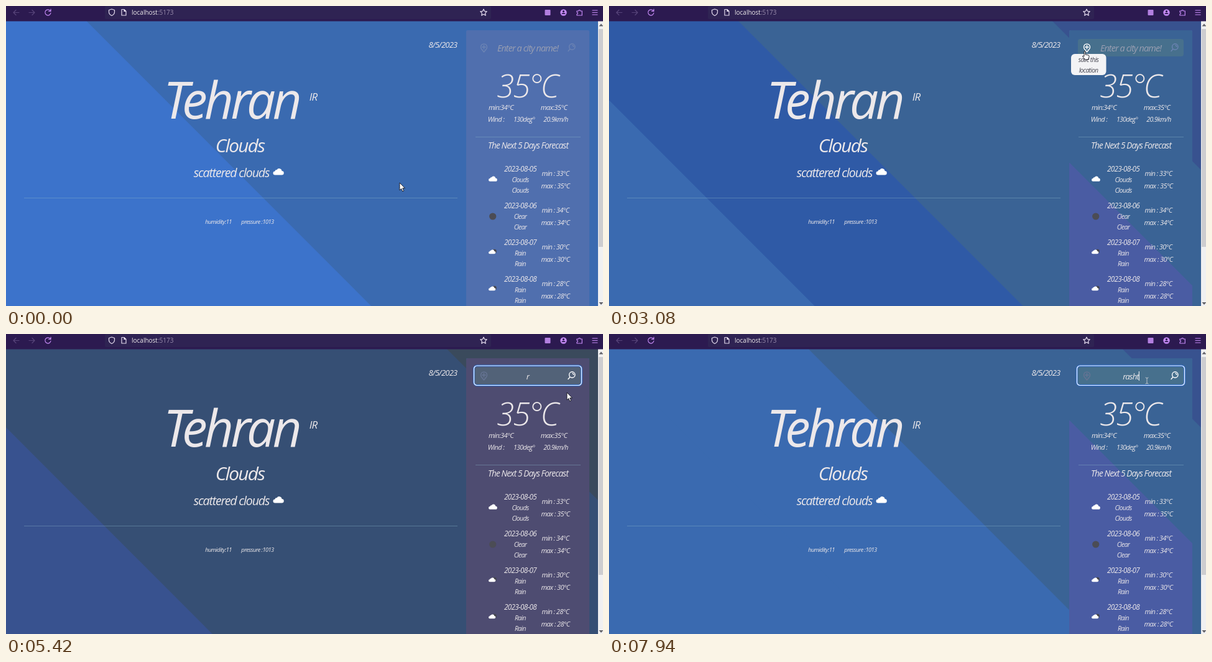
An HTML page for the animation above (8 s loop, 960 by 482 pixels).

```html
<!DOCTYPE html>
<html lang="en">
<head>
<meta charset="utf-8">
<title>Weather</title>
<style>
  html, body { margin: 0; width: 100%; height: 100%; overflow: hidden; background: #2c1a50; }
  svg { display: block; width: 960px; height: 482px; }
  text { font-family: "Open Sans", "Noto Sans", sans-serif; font-style: italic; letter-spacing: -.06em; fill: #ece8ea; text-anchor: middle; white-space: pre; }
  .url { font-style: normal; letter-spacing: 0; text-anchor: start; }
  .line { fill: none; stroke-linecap: round; stroke-linejoin: round; }
</style>
</head>
<body>
<svg id="stage" viewBox="0 0 960 482">
  <defs>
    <clipPath id="pageClip"><rect y="24" width="952" height="458"/></clipPath>
    <clipPath id="panelClip"><path d="M740 482V42q0-3 3-3H935q3 0 3 3V482Z"/></clipPath>
    <path id="cloud" d="M3 11a3 3 0 0 1 0-6 2.500 2.500 0 0 1 3-2.200 4.300 4.300 0 0 1 8 1.700 3.200 3.200 0 0 1 0 6.500Z"/>
  </defs>
  <g id="sky" clip-path="url(#pageClip)"></g>
  <g id="panel" clip-path="url(#panelClip)"></g>
  <g id="labels"></g>

  <g id="chrome">
    <rect width="960" height="24.500" fill="#2c1a50"/>
    <rect x="159" width="621" height="21" rx="2" fill="#2f2353"/>
    <g class="line" stroke-width="1.200">
      <path d="M21 10.500H12M16 6.500l-4 4 4 4M37 10.500h9M42 6.500l4 4-4 4" stroke="#57447a"/>
      <path d="M71 7.500a4.600 4.600 0 1 0 1 3.500M72 5v3.500h-3.500" stroke="#c58af5"/>
      <path d="M170 5l4.500 1.500v3q0 4-4.500 6-4.500-2-4.500-6v-3ZM186 5.500h4l3 3v6.500h-7ZM190 5.500v3h3" stroke="#e4dbee"/>
      <path d="M768 5l1.600 3.400 3.700.4-2.700 2.600.7 3.700-3.300-1.800-3.300 1.800.7-3.700-2.700-2.600 3.700-.4Z" stroke="#e4dbee"/>
      <path d="M918 8h2.500a1.700 1.700 0 0 1 3.300 0h2.500v7h-8.300v-2a1.500 1.500 0 0 0 0-3ZM943 7h8M943 10.500h8M943 14h8" stroke="#c58af5"/>
    </g>
    <rect x="866.500" y="6" width="9" height="9" rx="1" fill="#b37fe0"/>
    <circle cx="896.500" cy="10.500" r="5.200" fill="#c58af5"/>
    <circle cx="896.500" cy="8.700" r="1.600" fill="#2c1a50"/>
    <path d="M893.500 13a3 2 0 0 1 6 0Z" fill="#2c1a50"/>
    <text class="url" x="202" y="14" font-size="10">localhost<tspan fill="#9b8eae">:5173</tspan></text>
  </g>
  <g id="scrollbar">
    <rect x="952" y="24.500" width="8" height="458" fill="#f0f0f1"/>
    <rect x="953" y="37" width="7" height="350" fill="#cdcdd0"/>
    <path d="M953.500 32.500l3.500-4 3.500 4M953.500 476l3.500 4 3.500-4" fill="#606066"/>
  </g>

  <path d="M29 308.500H726M755 210.500H924" stroke="#8ab4c8" stroke-opacity=".4"/>
  <use href="#cloud" x="429.500" y="260.500" fill="#fff"/>
  <g id="search">
    <rect id="field" x="754" y="53" width="170" height="28" rx="4" fill="#5a8282" fill-opacity=".42"/>
    <g id="ring" fill="none">
      <rect x="752.500" y="51" width="173" height="31.500" rx="5" stroke="#2f6fd0" stroke-width="3"/>
      <rect x="752.500" y="51" width="173" height="31.500" rx="5" stroke="#f0f4fa" stroke-width="1.200"/>
    </g>
    <g class="line" stroke-width="1.400">
      <path id="pin" d="M768.500 74l-3.800-4.800a5 5 0 1 1 7.600 0ZM768.500 63v6M765.500 66h6"/>
      <path id="lens" d="M915 65.500a4.700 4.700 0 1 1-9.400 0 4.700 4.700 0 1 1 9.400 0M907 69l-3 3.500M911 63.300a2.400 2.400 0 0 1 1.800 2"/>
    </g>
    <text id="hint" x="839" y="73" font-size="14.400" style="fill:#9a9fb2">Enter a city name!</text>
    <text id="query" x="839" y="73" font-size="13"></text>
    <path id="caret" d="M0 60v15" stroke="#fff"/>
  </g>
  <g id="tip">
    <rect x="743" y="77" width="56.500" height="34" rx="6" fill="#f3f3f5"/>
    <text x="771" y="90" font-size="10" style="fill:#454550">save this</text>
    <text x="771" y="107" font-size="10" style="fill:#454550">location</text>
  </g>
  <g id="pointer">
    <path id="arrow" d="M0 0v12l2.700-2.500 2 4.400 2-.9-2-4.200h3.800Z" fill="#fff" stroke="#15151c" stroke-width=".9"/>
    <path id="hand" d="M-1 1q1-2 2 0v5l5 1q1.500 1 1 3l-1.500 4h-5l-4-5q0-2 2.500 0Z" fill="#fff" stroke="#15151c" stroke-width=".9"/>
    <path id="beam" class="line" d="M-2-5q2 0 2 1.500V3.500Q0 5-2 5M2-5q-2 0-2 1.500M0 3.500Q0 5 2 5" stroke="#c9ccd4" stroke-width=".9"/>
    <g id="deny"><circle r="4.600" fill="#fff" stroke="#c8192c" stroke-width="2"/><path d="M-3-3l6 6" stroke="#c8192c" stroke-width="2"/></g>
  </g>
</svg>
<script>
const LOOP = 8000;
const $ = id => document.getElementById(id);
const make = (parent, tag, attrs) => {
  const el = document.createElementNS("http://www.w3.org/2000/svg", tag);
  for (const k in attrs) el.setAttribute(k, attrs[k]);
  return parent.appendChild(el);
};
const show = (id, on) => $(id).setAttribute("visibility", on ? "visible" : "hidden");

function label(x, y, size, str, weight = 400) {
  make($("labels"), "text", { x, y, "font-size": size, "font-weight": weight }).textContent = str;
}

// Diagonal colour bands; each lies over the one before it.
function bands(parent, colours) {
  return colours.map((fill, i) => make(parent, "path", {
    fill, d: i ? "M0 0H7000V482H482Z" : "M0 0H960V482H0Z"
  })).slice(1);
}
const sky = bands($("sky"), ["#3c73cb", "#3a6ab0", "#2f5aa6", "#3a6395", "#38528f", "#364f74", "#3a4a5c"]);
const panel = bands($("panel"), ["#4c75c7", "#506fae", "#4a5ca3", "#3a6395", "#39607a", "#4e4c71"]);
const place = (list, xs) => list.forEach((el, i) => el.setAttribute("transform", `translate(${xs[i]})`));

label(702.5, 67, 13, "8/5/2023");
label(362, 181, 82, "Tehran");
label(494, 152, 17, "IR");
label(376, 235, 30, "Clouds");
label(362.5, 275, 19.7, "scattered clouds");
label(341.5, 350, 9.3, "humidity:11");
label(404.5, 350, 9.3, "pressure :1013");
label(837.5, 147, 52, "35°C", 300);
label(796, 167, 11.2, "min:34°C");
label(881, 167, 11.2, "max:35°C");
label(788, 186, 11, "Wind :");
label(833, 186, 10.6, "130deg°");
label(884, 186, 10.6, "20.9km/h");
label(839.5, 229, 13.6, "The Next 5 Days Forecast");

[["Clouds", 33, 35], ["Clear", 34, 34], ["Rain", 30, 30], ["Rain", 28, 28]].forEach(([kind, min, max], i) => {
  const y = 59 * i;
  label(827, y + 266, 11.7, "2023-08-0" + (5 + i));
  label(827, y + 283, 10.4, kind);
  label(827, y + 300, 10.4, kind);
  label(883.5, y + 273, 11, `min : ${min}°C`);
  label(883.5, y + 293, 11, `max : ${max}°C`);
  const icons = $("labels");
  if (kind === "Clear") make(icons, "circle", { cx: 782.7, cy: 338, r: 5.6, fill: "#4b4c55" });
  else {
    const scale = kind === "Rain" ? 0.66 : 0.8;
    if (kind === "Rain") make(icons, "circle", { cx: 785.5, cy: y + 276, r: 3.2, fill: "#45464f" });
    make(icons, "use", { href: "#cloud", fill: "#fff", transform: `translate(776 ${y + 273}) scale(${scale})` });
  }
});

// Time and offset of the gradient.
const DRIFT = [[0, 955], [1850, 1340], [2060, 1265], [3080, -150], [4280, -1525],
  [5420, -1790], [6400, -1850], [7040, -1470], [7940, -40], [8000, 60]];
const MOVES = [[0, 633, 284], [900, 633, 284], [2060, 687, 191], [2850, 765, 72], [3500, 765, 72],
  [4150, 906, 69], [4400, 906, 69], [4700, 850, 69], [4950, 850, 69], [5300, 902, 94],
  [5800, 902, 94], [6500, 865, 75], [8000, 865, 75]];
const KEYS = [[4900, "r"], [5500, "ra"], [7250, "ras"], [7480, "rash"], [7700, "rasht"]];

const segment = (keys, t) => Math.max(0, Math.min(keys.length - 2, keys.findIndex(k => k[0] > t) - 1));

function drift(t) {
  const k = DRIFT, i = segment(k, t);
  const rate = j => (k[j + 1][1] - k[j][1]) / (k[j + 1][0] - k[j][0]);
  const slope = j => {
    if (j === 0 || j === k.length - 1) return rate(Math.min(j, k.length - 2));
    const a = rate(j - 1), b = rate(j);
    return a * b <= 0 ? 0 : 2 * a * b / (a + b);
  };
  const h = k[i + 1][0] - k[i][0], u = (t - k[i][0]) / h, v = 1 - u;
  return v * v * (1 + 2 * u) * k[i][1] + u * u * (1 + 2 * v) * k[i + 1][1]
    + h * u * v * (v * slope(i) - u * slope(i + 1));
}

function mouse(t) {
  const i = segment(MOVES, t), [t0, x0, y0] = MOVES[i], [t1, x1, y1] = MOVES[i + 1];
  const u = (t - t0) / (t1 - t0), e = u * u * (3 - 2 * u);
  return [x0 + (x1 - x0) * e, y0 + (y1 - y0) * e];
}

function draw(t) {
  const b = drift(t);
  place(sky, [b - 850, b, b + 335, b + 840, b + 1640, b + 2475]);
  sky[1].setAttribute("fill", t > 6500 ? "#3a6ab0" : "#2f5aa6");
  place(panel, [2 * b - 1660, b + 250, b + 640, b + 1300, b + 2022]);

  const [x, y] = mouse(t);
  const inField = x > 754 && x < 924 && y > 53 && y < 81;
  const key = KEYS.filter(k => k[0] <= t).pop();
  const focus = t >= 4700;
  const onPin = inField && x < 780, onLens = inField && x > 897;
  const shape = onPin ? "hand" : onLens ? (key ? "hand" : "deny") : inField ? "beam" : "arrow";
  for (const s of ["arrow", "hand", "beam", "deny"]) show(s, s === shape);
  $("pointer").setAttribute("transform", `translate(${x} ${y})`);
  show("tip", onPin);
  show("field", t > 2500);
  show("ring", focus);
  $("pin").setAttribute("stroke", onPin ? "#fff" : focus ? "#667494" : "#6c84b4");
  $("lens").setAttribute("stroke", key ? "#fff" : "#6c84b4");

  show("hint", !key);
  $("query").textContent = key ? key[1] : "";
  const since = t - (key ? key[0] : 4700);
  show("caret", focus && since % 1000 < 500);
  const half = key ? $("query").getComputedTextLength() / 2 : 0;
  $("caret").setAttribute("transform", `translate(${839.5 + half})`);
}

const start = performance.now();
function tick() {
  draw((performance.now() - start) % LOOP);
  requestAnimationFrame(tick);
}
draw(0);
requestAnimationFrame(tick);
</script>
</body>
</html>
```
